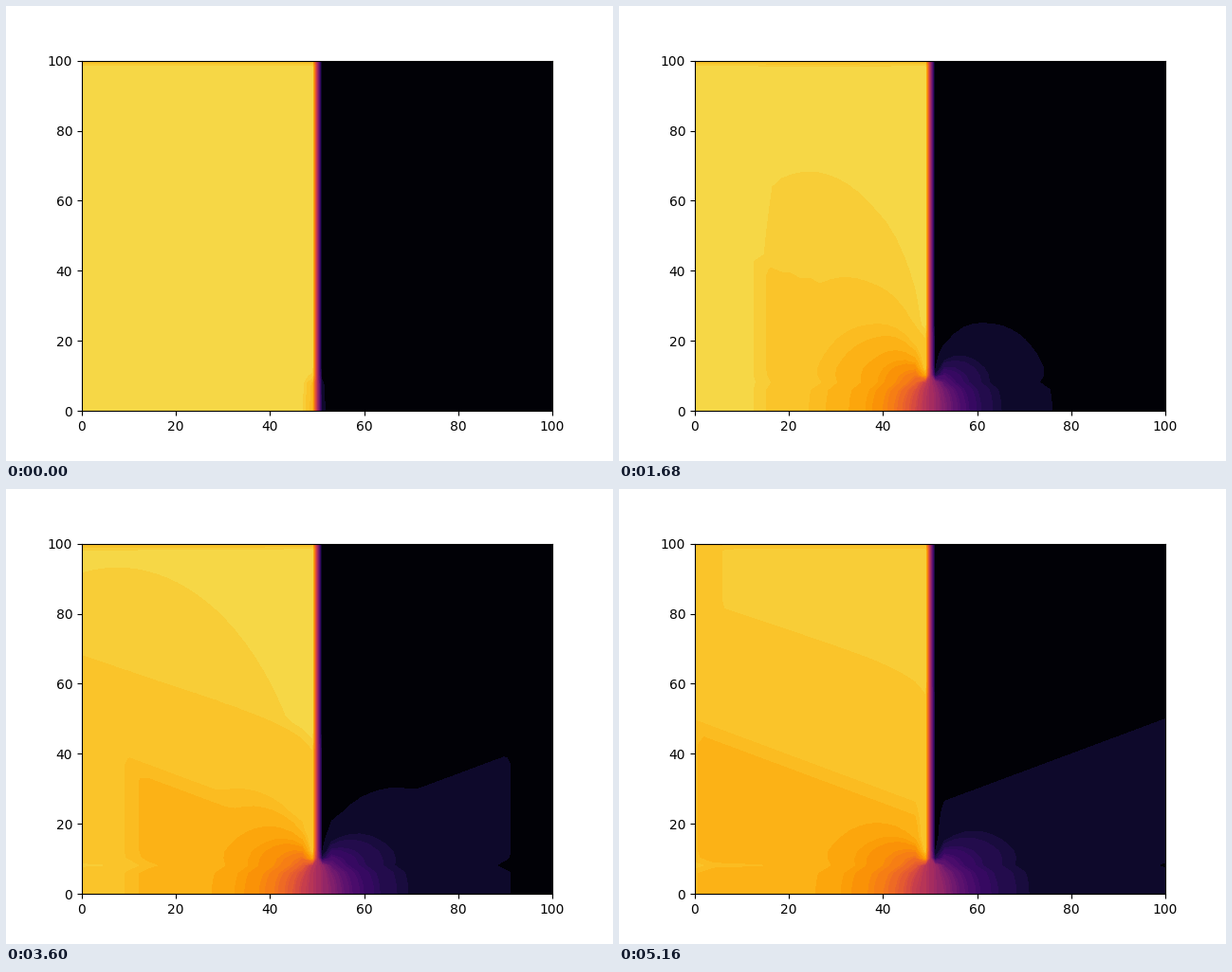
Recreate the animation shown at these times as a matplotlib script. Size 640 by 480 pixels, loop 5.22 s.

```python
import numpy as np
import matplotlib.pyplot as plt
from matplotlib.animation import FuncAnimation

FRAMES, INTERVAL, N = 87, 60, 50
HIGH, LOW = 0.9, 0.0

axis = np.linspace(0, 100, N)
X, Y = np.meshgrid(axis, axis)
D = np.abs(X - 50)
wall = (D < 2) & (Y > 9)

# Steady spread behind the slit: the angle under which it is seen.
SLIT, STRETCH = 7.3, 1.45
ye = Y / STRETCH
steady = 0.92 * (np.arctan((ye + SLIT) / D) - np.arctan((ye - SLIT) / D)) / (2 * np.pi)

# The row at the lip of the slit lags behind its neighbours.
lag = np.ones_like(D)
lag[4] = np.where(D[4] > 2, 0.92 - 0.006 * np.maximum(D[4] - 20, 0), 1)
lag[5] = np.where(D[5] > 2, 0.97, 1)

pairs = [0.1 + 0.045 * k + e for k in range(16) for e in (0, 0.015)]
LEVELS = np.array([-0.03, 0.05, *pairs, 0.815, 0.838, 0.85, 0.872, 0.888, 0.915])
COLORS = plt.get_cmap("inferno")((LEVELS[:-1] + LEVELS[1:]) / 2)


def ramp(v):
    return np.clip(v, 0, 1)


def exchange(t):
    """Amount that has passed from the left half to the right half."""
    reach = 3 + 1.27 * t
    width = 2 + 0.15 * t

    # jet around the slit
    arrival = ramp((reach + 1.2 - D) / width)
    growth = 1 - np.exp(-(t + 0.6) / (2 + 0.8 * np.minimum(D, 12)))
    jet = steady * growth * (1 + 0.0015 * t) * (1 - 0.52 * np.minimum(D / reach, 1))
    jet = jet * arrival * np.where(wall, 0.4, 1)

    # fast weak wave
    rise = 1.85 * (Y - 7 - 0.45 * D + 5 * np.exp(-D / 5))
    wave = 0.036 * ramp((reach + 1.2 - np.maximum(D, rise)) / width)
    wave = wave * min(1, t / 4) * np.where(wall, 0.85, 1)

    # slow stronger wave
    far = np.interp(t, [0, 50, 68, 86], [18, 45, 62, 66])
    up = 33 + 0.22 * (t - 50)
    slow = np.minimum(ramp((up + 0.5 * D - Y) / 24), ramp((far - D) / 20))
    slow = 0.075 * slow * min(1, t / 20) * arrival * np.where(wall, 0.4, 1)

    # echo from the outer walls
    echo = ramp((t - 70) / 16) * (0.018 + 0.015 * ramp((D - 40) / 6))

    total = np.maximum.reduce([jet, wave, slow]) * lag
    return np.minimum(np.maximum(total, echo), 0.42)


def field(t):
    s = exchange(t)
    u = np.where(X < 50, HIGH - s, LOW + s)
    left = axis < 50
    u[-1, left] = np.minimum(u[-1, left], HIGH - 0.06)
    return u


fig, ax = plt.subplots(figsize=(6.4, 4.8), dpi=100)


def draw(i):
    ax.clear()
    ax.contourf(X, Y, field(i), levels=LEVELS, colors=COLORS)
    ax.set_xlim(0, 100)
    ax.set_ylim(0, 100)
    return []


anim = FuncAnimation(fig, draw, frames=FRAMES, interval=INTERVAL,
                     init_func=lambda: [], repeat=True, repeat_delay=0)
plt.show()
```
